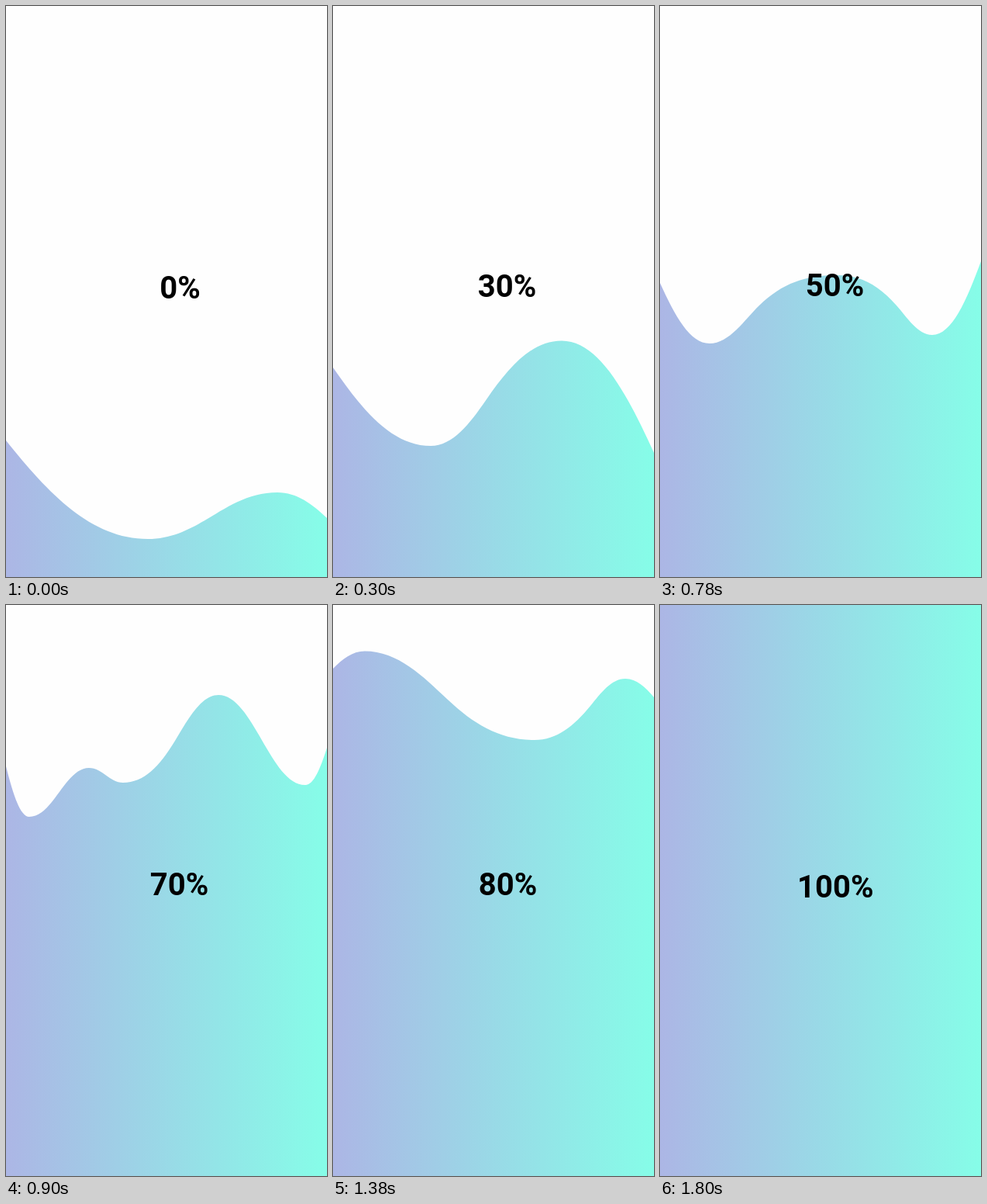
Write an HTML page that moves like this. It is 414 by 736 pixels and loops after 2.1 s.

```html
<!DOCTYPE html>
<html lang="en">
<head>
<meta charset="utf-8">
<title>Filling wave</title>
<style>
  html, body { margin: 0; width: 100%; height: 100%; overflow: hidden; background: #fefefe; }
  svg { display: block; width: 414px; height: 736px; }
  text { font: 700 40px Roboto, Arial, sans-serif; text-anchor: middle; }
</style>
</head>
<body>
<svg viewBox="0 0 414 736">
  <linearGradient id="fill" gradientUnits="userSpaceOnUse" x1="0" x2="414">
    <stop stop-color="#acb6e5"/>
    <stop offset="1" stop-color="#86fde8"/>
  </linearGradient>
  <path id="wave" fill="url(#fill)"/>
  <text id="label"></text>
</svg>
<script>
const HOLD = 300;
const STEEPNESS = 1.8; // slope halfway up a swell, relative to its straight chord

// Key points are the stage edges, crests, troughs and off-centre turning points.
const steps = [
  { percent: 0, x: 224.5, y: 377, crest: '0 560, 183 687, 350 627, 414 660' },
  { percent: 30, x: 224.5, y: 375, crest: '0 466, 126 567, 198 507, 295 431.5, 414 576' },
  { percent: 50, x: 225.5, y: 374, crest: '0 357, 64 435, 128 386, 228 347, 305 386, 351 424, 414 329' },
  { percent: 70, x: 223.5, y: 374, crest: '0 208, 30 273, 107 210, 151 229, 218 175, 274 116, 386 232, 414 184' },
  { percent: 80, x: 225.5, y: 374, crest: '0 82, 41 59.5, 148 122, 260 174, 332 130, 377 95, 414 119' },
  { percent: 90, x: 226.5, y: 377, crest: '0 78, 5 90, 22 70, 100 1.5, 264 74, 333 34, 376 3, 414 27' },
  { percent: 100, x: 226.3, y: 377, crest: '0 0, 414 0' }
];

// Flat at crests and troughs, steep everywhere else.
function slopeAt(pts, i) {
  const [x, y] = pts[i];
  const [px, py] = pts[i - 1] || pts[i];
  const [nx, ny] = pts[i + 1] || pts[i];
  const turns = (y - py) * (ny - y) < 0;
  return turns ? 0 : STEEPNESS * (ny - py) / (nx - px);
}

function wavePath(crest) {
  const pts = crest.split(',').map(p => p.trim().split(' ').map(Number));
  const handle = (i, width) => {
    const [x, y] = pts[i], slope = slopeAt(pts, i);
    const dx = width * (slope ? 0.3 : 0.4);
    return [x + dx, y + dx * slope];
  };
  let d = `M0 736L${pts[0]}`;
  for (let i = 1; i < pts.length; i++) {
    const width = pts[i][0] - pts[i - 1][0];
    d += `C${handle(i - 1, width)} ${handle(i, -width)} ${pts[i]}`;
  }
  return d + 'V736Z';
}

const wave = document.getElementById('wave');
const label = document.getElementById('label');
let shown;

function draw() {
  const step = steps[Math.floor(performance.now() / HOLD) % steps.length];
  if (step !== shown) {
    shown = step;
    wave.setAttribute('d', wavePath(step.crest));
    label.setAttribute('x', step.x);
    label.setAttribute('y', step.y);
    label.textContent = step.percent + '%';
  }
  requestAnimationFrame(draw);
}
draw();
</script>
</body>
</html>
```
